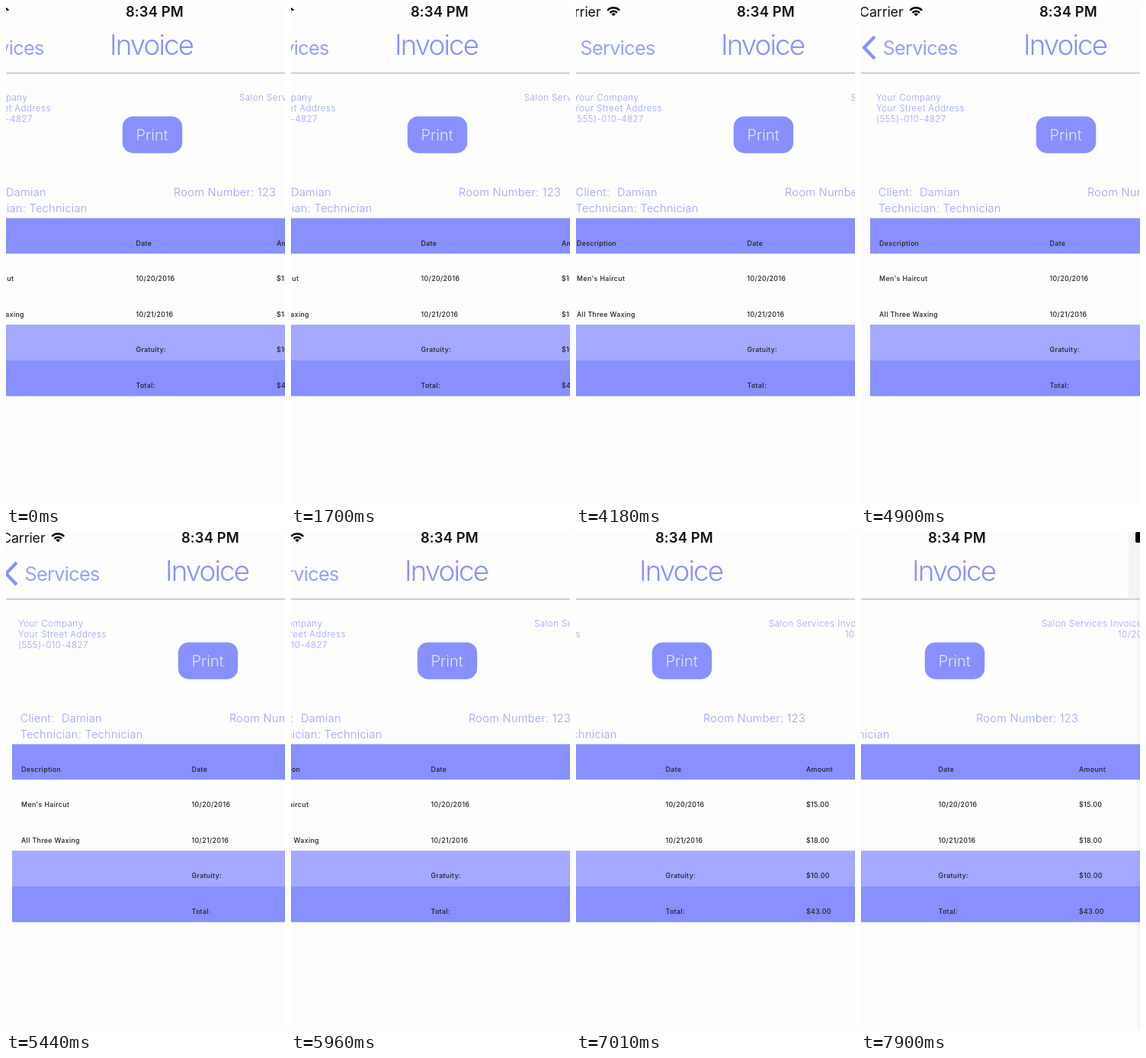
An HTML page with a canvas that plays this animation: 366x652 px, repeating every 7.99 s.

```html
<!DOCTYPE html>
<html lang="en">
<head>
<meta charset="utf-8">
<title>Invoice</title>
<style>
  html, body { margin: 0; width: 100%; height: 100%; overflow: hidden; background: #fdfdfd; }
  canvas { display: block; width: 366px; height: 652px; }
</style>
</head>
<body>
<canvas id="stage"></canvas>
<script>
const W = 366, H = 652, LOOP = 7990;
const PAN_START = 3210, STEP = 88.49;
const PURPLE = '#8890ff', PALE = '#a4a9ff', INK = '#1d1d24', SOFT = '#989eff';

const canvas = document.getElementById('stage');
const ctx = canvas.getContext('2d');
const dpr = window.devicePixelRatio || 1;
canvas.width = W * dpr;
canvas.height = H * dpr;

// [pan step, page offset]
const path = [[-1, -77], [0, -75], [11, -23], [19, 0], [22, 4], [23, 4], [31, -64], [43, -130], [53, -146]];
const slopes = path.map((p, i) => {
  if (i === 0 || i === path.length - 1) return i ? -1 : 0;
  const a = (p[1] - path[i - 1][1]) / (p[0] - path[i - 1][0]);
  const b = (path[i + 1][1] - p[1]) / (path[i + 1][0] - p[0]);
  return a * b <= 0 ? 0 : 2 * a * b / (a + b);
});

function offsetAt(ms) {
  const k = Math.floor((ms - PAN_START) / STEP + 0.1);
  if (k < 0) return path[0][1];
  let i = 0;
  while (i < path.length - 2 && k >= path[i + 1][0]) i++;
  const [x0, y0] = path[i], [x1, y1] = path[i + 1];
  const d = x1 - x0, u = Math.min(1, (k - x0) / d), v = 1 - u;
  const y = y0 * (1 + 2 * u) * v * v + slopes[i] * d * u * v * v
          + y1 * u * u * (3 - 2 * u) - slopes[i + 1] * d * u * u * v;
  return Math.round(y);
}

function box(x, y, w, h, color, r = 0) {
  ctx.fillStyle = color;
  ctx.beginPath();
  ctx.roundRect(x, y, w, h, r);
  ctx.fill();
}

function text(str, x, y, size, color, weight = 400, spacing = 0) {
  ctx.font = `${weight} ${size}px Inter, Roboto, sans-serif`;
  ctx.letterSpacing = spacing + 'px';
  ctx.fillStyle = color;
  ctx.fillText(str, x, y);
}

function wifi(x, y) {
  ctx.strokeStyle = '#000';
  ctx.lineWidth = 2.4;
  for (const r of [6.5, 11]) {
    ctx.beginPath();
    ctx.arc(x, y, r, -Math.PI * 0.76, -Math.PI * 0.24);
    ctx.stroke();
  }
  ctx.fillStyle = '#000';
  ctx.beginPath();
  ctx.moveTo(x, y);
  ctx.arc(x, y, 3.8, -Math.PI * 0.76, -Math.PI * 0.24);
  ctx.fill();
}

function header() {
  box(497, 0, 60, 87, '#f4f4f4');
  text('Carrier', -2, 13.6, 17.8, '#111', 400, -0.1);
  wifi(72.2, 13.3);
  text('8:34 PM', 234, 13.6, 18.4, '#111', 600, 0.1);
  box(506, 0, 34, 14, '#000', 2);
  ctx.strokeStyle = PURPLE;
  ctx.lineWidth = 4.2;
  ctx.beginPath();
  ctx.moveTo(18, 40);
  ctx.lineTo(4, 54.5);
  ctx.lineTo(18, 69);
  ctx.stroke();
  text('Services', 28.5, 63.6, 25.2, SOFT, 400, -0.65);
  text('Invoice', 213, 64, 36.8, PURPLE, 300, -1.95);
  box(-60, 87.3, 640, 1.2, '#b4b4b4');
}

function details() {
  const small = (str, x, y) => text(str, x, y, 11.5, SOFT, 300, 0.5);
  const medium = (str, x, y) => text(str, x, y, 14.6, SOFT, 300, 0.27);
  small('Your Company', 20, 123.5);
  small('Your Street Address', 20, 137.8);
  small('(555)-010-4827', 20, 152.2);
  small('Salon Services Invoice', 383, 123.5);
  small('10/20/2016', 483, 137.8);
  box(229.8, 144.5, 78.4, 48.2, PURPLE, 14);
  text('Print', 247.5, 175.5, 20, '#e4e6ff', 300, 0);
  medium('Client:', 22.5, 248.5);
  medium('Damian', 77, 248.5);
  medium('Technician: Technician', 22.5, 269.5);
  medium('Room Number: 123', 297, 248.5);
}

const rows = [
  ['Description', 'Date', 'Amount'],
  ["Men's Haircut", '10/20/2016', '$15.00'],
  ['All Three Waxing', '10/21/2016', '$18.00'],
  ['', 'Gratuity:', '$10.00'],
  ['', 'Total:', '$43.00']
];
const bands = [[0, 1, PURPLE], [3, 2, PURPLE], [3, 1, PALE]];
const columns = [24, 247.5, 432];

function table() {
  const top = 277.7, row = 46.6;
  for (const [i, n, color] of bands) box(12, top + i * row, 520, n * row, color);
  rows.forEach((cells, i) => {
    cells.forEach((cell, j) => text(cell, columns[j], top + i * row + 35.8, 8.8, INK, 500, 0.36));
  });
}

function draw(ms) {
  ctx.setTransform(dpr, 0, 0, dpr, 0, 0);
  box(0, 0, W, H, '#fdfdfd');
  ctx.translate(offsetAt(ms), 0);
  header();
  details();
  table();
  box(508, 88, 60, 564, 'rgba(0,0,0,0.025)');
}

function tick(now) {
  draw(now % LOOP);
  requestAnimationFrame(tick);
}
requestAnimationFrame(tick);
</script>
</body>
</html>
```
